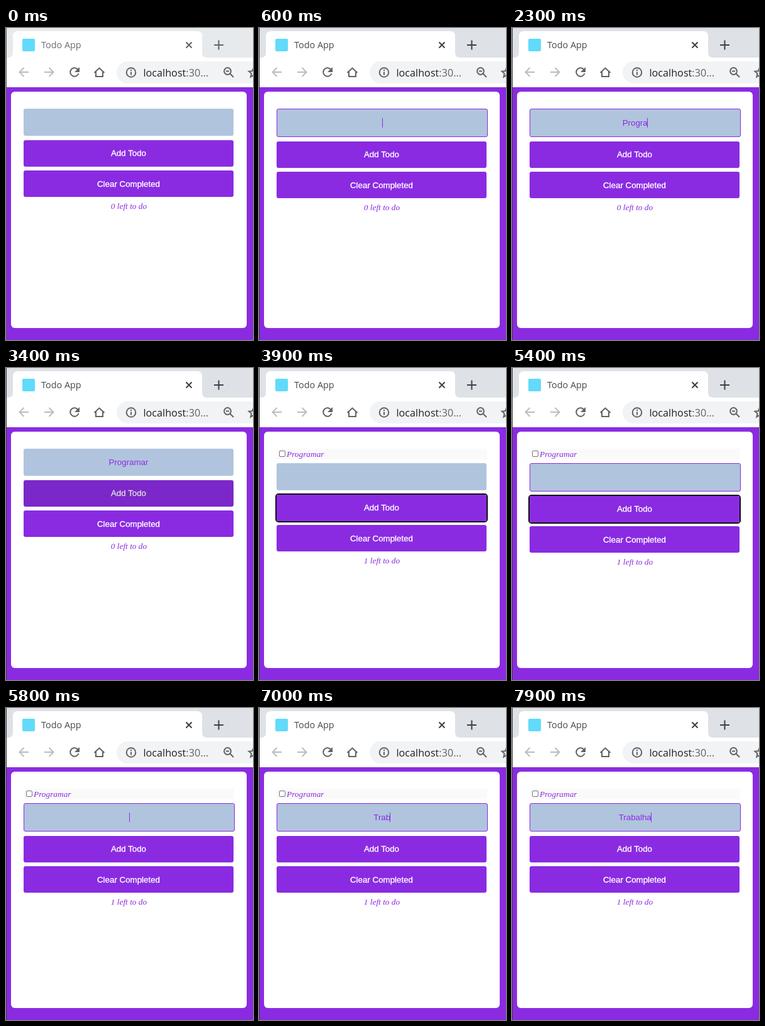
An HTML page that plays this animation: 393 by 495 pixels, repeating every 8 s.

```html
<!DOCTYPE html>
<html lang="en">
<head>
<meta charset="utf-8">
<title>Todo App</title>
<style>
  html, body { margin: 0; width: 100%; height: 100%; overflow: hidden; background: #fff; }
  svg { display: block; }
  .ui { font-family: "Open Sans", "Noto Sans", sans-serif; }
  .field, .button text { font: 13.333px "Liberation Sans", Arial, sans-serif; text-anchor: middle; }
  .button rect { fill: #8a2be2; }
  .button text { fill: #fff; stroke: #fff; stroke-width: .35px; }
  .pressed rect { fill: #7b27c9; }
  .pressed text { fill: #ddd; stroke: #ddd; }
  .note { font: italic 13.333px "Liberation Serif", "Times New Roman", serif; }
  .purple { fill: #8a2be2; }
  .icon { fill: none; stroke: #5f6368; stroke-width: 2; }
  .faded { stroke: #babcbe; }
  #strip { fill: #e7eaed; }
  #title { fill: #6a6d72; font-size: 14.4px; }
  #edge { fill: #5a5d55; }
  .active #strip { fill: #dee1e6; }
  .active #title { fill: #45494d; }
  .active #edge { fill: #3c3b3e; }
  .active .tabicon { stroke: #3c4043; }
</style>
</head>
<body>
<svg id="stage" width="393" height="495" viewBox="0 0 393 495">
  <rect id="strip" width="393" height="48"/>
  <path fill="#fff" d="M3 47Q11 47 11 39V13Q11 5 19 5H304Q312 5 312 13V39Q312 47 320 47H393V94H0V47Z"/>
  <rect x="26" y="17" width="20" height="20" rx="2" fill="#61dafb"/>
  <text id="title" class="ui" x="56" y="32">Todo App</text>
  <path class="icon tabicon" d="M286.5 22.500l9 9m0-9l-9 9"/>
  <path class="icon tabicon" d="M338.500 19.500v15M331 27h15"/>

  <path class="icon faded" d="M36 70H21.500M28.500 63l-7 7 7 7"/>
  <path class="icon faded" d="M61 70H75.500M68.500 63l7 7-7 7"/>
  <path class="icon" d="M114.500 66A6.800 6.800 0 1 0 115.500 72"/>
  <path fill="#5f6368" d="M117 62v8h-8z"/>
  <path class="icon" d="M140.500 71l8-7.500 8 7.500M143 69v8h11v-8"/>

  <rect x="176" y="53" width="240" height="35" rx="17.500" fill="#f1f3f4"/>
  <circle class="icon" cx="199" cy="70.500" r="7.300" stroke-width="1.800"/>
  <path class="icon" d="M199 69.500v5M199 66v2"/>
  <text class="ui" x="218.500" y="77" font-size="16.200" fill="#202124">localhost<tspan fill="#5f6368">:30...</tspan></text>
  <circle class="icon" cx="352.500" cy="68.500" r="5.400" stroke-width="1.800"/>
  <path class="icon" d="M356.500 72.500l5.500 5.500M350 68.500h5"/>
  <path class="icon" stroke-width="1.600" d="M394 63l-2.200 5.200-5.300.5 4 3.600-1.200 5.400 4.700-2.900"/>

  <rect y="94" width="393" height="401" fill="#8a2be2"/>
  <rect x="8" y="101" width="375" height="375" rx="6" fill="#fff"/>

  <g id="item">
    <rect x="28" y="128" width="335" height="17" fill="#fafafa"/>
    <rect x="32.500" y="131.500" width="9" height="9" rx="1.500" fill="#fff" stroke="#767676"/>
    <text class="note purple" x="44" y="141">Programar</text>
  </g>

  <g id="form">
    <rect id="box" fill="#b0c4de"/>
    <text id="value" class="field purple"></text>
    <rect id="caret" class="purple" y="143" width="1" height="15"/>
    <g id="below">
      <rect id="ring" x="27" y="177" width="336" height="44" rx="4" fill="none" stroke="#101010" stroke-width="2"/>
      <g id="add" class="button">
        <rect x="28" y="178" width="334" height="42" rx="3"/>
        <text x="195" y="203">Add Todo</text>
      </g>
      <g class="button">
        <rect x="28" y="226" width="334" height="42" rx="3"/>
        <text x="195" y="252">Clear Completed</text>
      </g>
      <text id="left" class="note purple" x="195.500" y="287" text-anchor="middle"></text>
    </g>
  </g>
  <rect id="edge" width="1" height="495"/>
</svg>
<script>
  const LOOP = 8000;
  const $ = id => document.getElementById(id);
  const [stage, item, form, box, value, caret, below, ring, add, left] =
    ["stage", "item", "form", "box", "value", "caret", "below", "ring", "add", "left"].map($);

  // Key press times, one per letter
  const words = [
    { text: "Programar", from: 600, to: 3900, keys: [1500, 1700, 1800, 1900, 2100, 2300, 2500, 2700, 2800] },
    { text: "Trabalha", from: 5700, to: LOOP, keys: [6300, 6600, 6800, 7000, 7100, 7500, 7800, 7900] }
  ];
  const caretOn = [[600, 1100], [1500, 3200], [5700, 6200], [6300, LOOP]];
  const framed = [[100, 3400], [4100, 4200], [5400, LOOP]];

  const within = (t, spans) => spans.some(([a, b]) => t >= a && t < b);
  const show = (el, on) => el.setAttribute("visibility", on ? "visible" : "hidden");
  const set = (el, attrs) => {
    for (const name in attrs) el.setAttribute(name, attrs[name]);
  };

  function typed(t) {
    const word = words.find(w => t >= w.from && t < w.to);
    return word ? word.text.slice(0, word.keys.filter(k => k <= t).length) : "";
  }

  function draw(t) {
    const added = t >= 3900;
    const border = within(t, framed);
    const text = typed(t);

    stage.classList.toggle("active", t >= 600);
    add.classList.toggle("pressed", t >= 3400 && t < 3900);
    show(item, added);
    show(ring, t >= 3900 && t < 5700);
    form.setAttribute("transform", `translate(0 ${added ? 23 : 0})`);
    below.setAttribute("transform", `translate(0 ${border ? 2 : 0})`);

    set(box, border
      ? { x: 28.5, y: 128.5, width: 335, height: 44, rx: 2.5, stroke: "#8a2be2" }
      : { x: 28, y: 128, width: 334, height: 43, rx: 3, stroke: "none" });

    const mid = border ? 195.7 : 195;
    if (value.textContent !== text) value.textContent = text;
    set(value, { x: mid, y: border ? 155 : 154 });
    const end = mid + value.getComputedTextLength() / 2;
    caret.setAttribute("x", text ? Math.round(end) - 1 : 196);
    show(caret, within(t, caretOn));

    const label = `${added ? 1 : 0} left to do`;
    if (left.textContent !== label) left.textContent = label;
  }

  const start = performance.now();
  function tick() {
    draw((performance.now() - start) % LOOP);
    requestAnimationFrame(tick);
  }
  tick();
</script>
</body>
</html>
```
